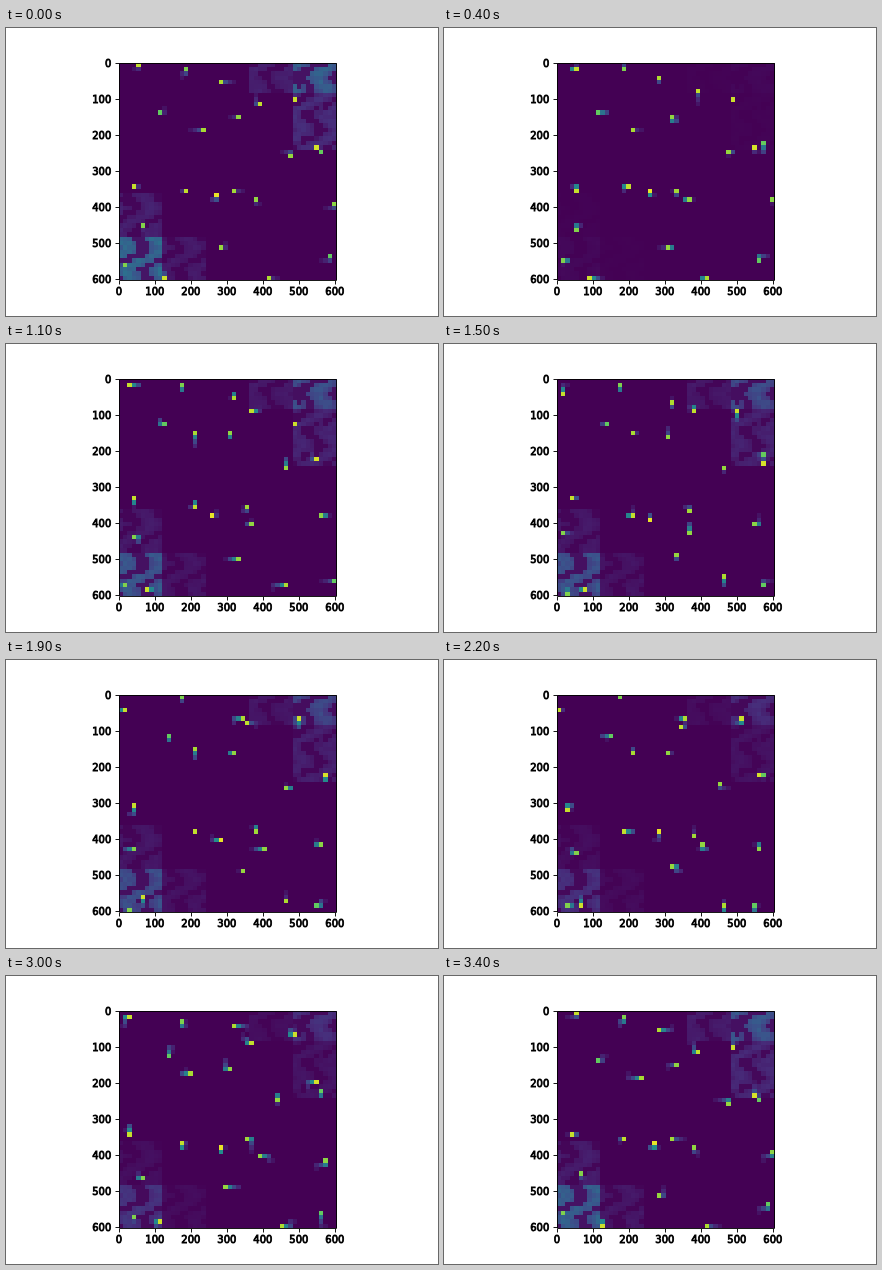
An HTML page with a canvas for the animation above (3500 ms loop, 432x288 px).

```html
<!DOCTYPE html>
<html lang="en">
<head>
<meta charset="utf-8">
<title>Heat map of walkers</title>
<style>
  html, body { margin: 0; width: 100%; height: 100%; overflow: hidden; background: #fff; }
  canvas, svg { position: absolute; left: 0; top: 0; }
  text { font: 10px "DejaVu Sans", sans-serif; stroke: #000; stroke-width: .8px; }
  path { fill: none; stroke: #000; stroke-opacity: .9; }
</style>
</head>
<body>
<canvas id="map" width="432" height="288"></canvas>
<svg id="axes" width="432" height="288"></svg>
<script>
const N = 50, STEPS = 35, STEP_MS = 100, TRAIL = 5;
const LEFT = 112.68, TOP = 34.56, CELL = 217.44 / N;

// Cells where the walkers start and end the loop, as row * 100 + column.
const HOMES = [4, 115, 423, 932, 840, 1109, 1227, 1519, 1945, 2046, 2139, 2803,
  2915, 3022, 2926, 3131, 3249, 3705, 4223, 4601, 4448, 4910, 4934];

// Warm corners: column, row, width, height, strength.
const PATCHES = [
  [40, 0, 10, 7, .33], [40, 7, 10, 13, .14], [30, 0, 10, 7, .1],
  [0, 40, 10, 10, .38], [0, 30, 10, 10, .1], [10, 40, 10, 10, .08]
];
// Strength of all warm corners over the loop: [step, share].
const GLOW = [[0, 1], [4, .06], [11, .8], [19, .7], [26, 0], [35, 1]];

const VIRIDIS = ["440154", "472d7b", "3b528b", "2c728e", "21918c", "28ae80", "5ec962", "addc30", "fde725"]
  .map(h => [0, 2, 4].map(i => parseInt(h.slice(i, i + 2), 16)));

let seed = 7;
const random = () => (seed = seed * 16807 % 2147483647) / 2147483647;
const clamp = (v, lo, hi) => Math.max(lo, Math.min(hi, v));
const mix = (a, b, f) => a + (b - a) * f;

function color(v) {
  const s = clamp(v, 0, 1) * 8, i = Math.min(7, Math.floor(s));
  return `rgb(${VIRIDIS[i].map((c, k) => Math.round(mix(c, VIRIDIS[i + 1][k], s - i)))})`;
}

// Uneven ground: mostly warm cells with ragged cold gaps.
const grain = Array.from({ length: N * N }, (_, i) => {
  const c = i % N, r = Math.floor(i / N);
  const wave = Math.sin(c * .8 + r * .5 + 2 * Math.sin(r * .7)) + random() - .5;
  return wave < -.4 ? .15 : .7 + .2 * wave;
});

// A random walk that turns back in time to be home when the loop ends.
function walk(home) {
  const homeX = home % 100, homeY = Math.floor(home / 100);
  let x = homeX, y = homeY;
  return Array.from({ length: STEPS }, (_, t) => {
    const here = [x, y];
    const dx = homeX - x, dy = homeY - y;
    const away = Math.abs(dx) + Math.abs(dy);
    const late = away >= STEPS - t - 2;
    const sideways = late ? random() * away < Math.abs(dx) : random() < .5;
    const move = late ? Math.sign(sideways ? dx : dy) : Math.floor(random() * 3) - 1;
    if (sideways) x = clamp(x + move, 0, N - 1);
    else y = clamp(y + move, 0, N - 1);
    return here;
  });
}
const walkers = HOMES.map(home => ({ path: walk(home), heat: .75 + .22 * random() }));

function glowAt(step) {
  const i = GLOW.findIndex(([s]) => s > step);
  const [s0, g0] = GLOW[i - 1], [s1, g1] = GLOW[i];
  return mix(g0, g1, (step - s0) / (s1 - s0));
}

const ctx = map.getContext("2d");
const edgeX = c => c === N ? 331 : Math.round(LEFT + c * CELL + .1);
const edgeY = r => Math.round(TOP + r * CELL);

function draw(step) {
  const heat = new Float32Array(N * N), glow = glowAt(step);

  for (const [c0, r0, w, h, strength] of PATCHES)
    for (let r = r0; r < r0 + h; r++)
      for (let c = c0; c < c0 + w; c++)
        heat[r * N + c] = strength * glow * grain[r * N + c];

  for (const walker of walkers)
    for (let age = 0; age < TRAIL; age++) {
      const [c, r] = walker.path[(step - age + STEPS) % STEPS], i = r * N + c;
      heat[i] = Math.max(heat[i], walker.heat * .5 ** age);
    }

  ctx.fillStyle = color(0);
  ctx.fillRect(113, 35, 218, 217);
  heat.forEach((v, i) => {
    if (!v) return;
    const c = i % N, r = Math.floor(i / N), x = edgeX(c), y = edgeY(r);
    ctx.fillStyle = color(v);
    ctx.fillRect(x, y, edgeX(c + 1) - x, edgeY(r + 1) - y);
  });
}

let lines = "M113.5 35.5H330.5V252.5H113.5Z", labels = "";
for (let n = 0; n <= 600; n += 100) {
  const x = LEFT + (n + .5) * .36, y = TOP + (n + .5) * .36;
  lines += `M${Math.round(x) + .5} 253v3.5M113 ${Math.round(y) + .5}h-3.5`;
  labels += `<text x="${x}" y="267" text-anchor="middle">${n}</text>
    <text x="105.3" y="${y + 4}" text-anchor="end">${n}</text>`;
}
axes.innerHTML = `<path d="${lines}"/>${labels}`;

let shown = -1;
function tick() {
  const step = Math.floor(performance.now() / STEP_MS) % STEPS;
  if (step !== shown) draw(shown = step);
  requestAnimationFrame(tick);
}
tick();
</script>
</body>
</html>
```
